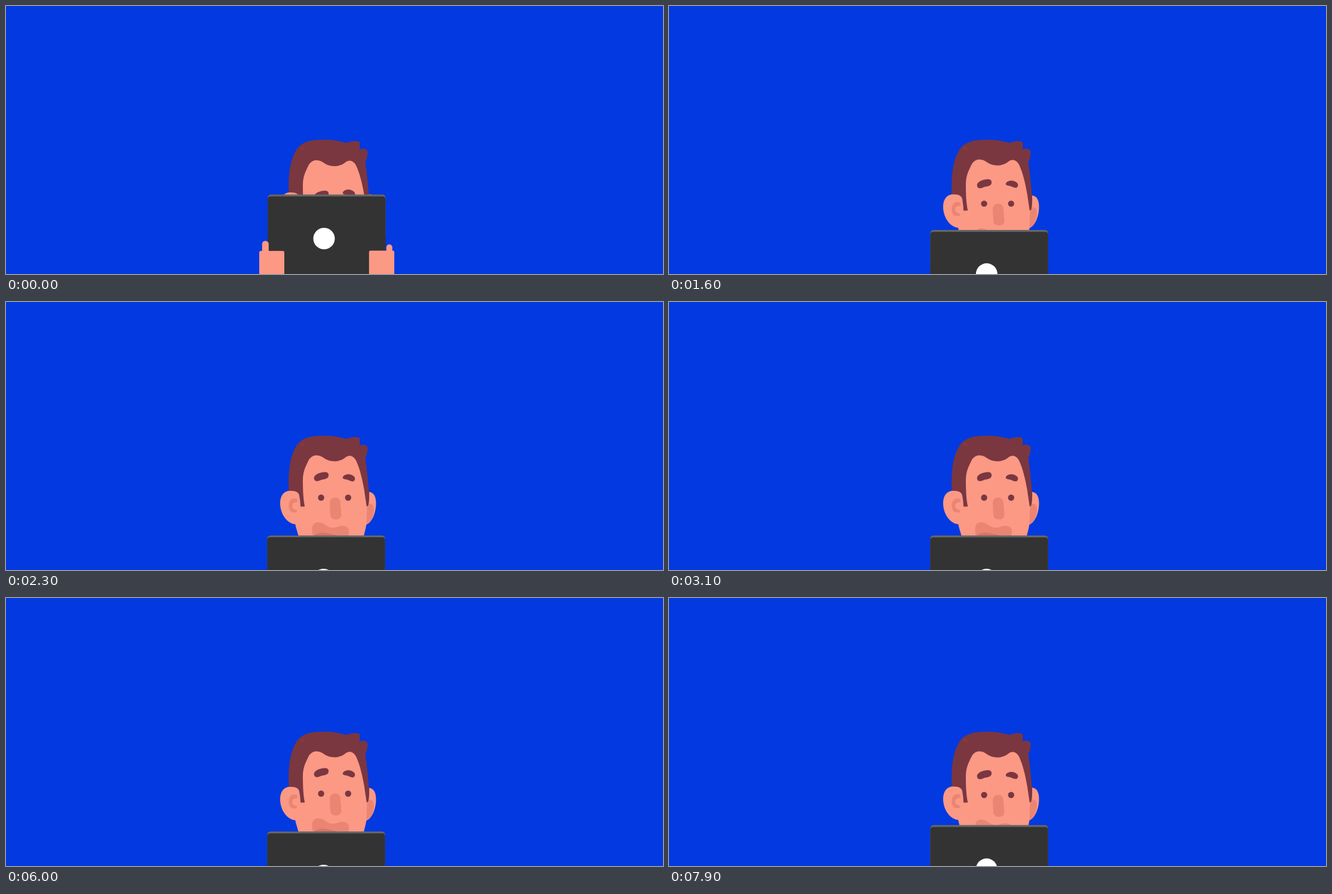
These frames come from a looping animation (1100x450 px, 8000 ms). An HTML page:

```html
<!DOCTYPE html>
<html lang="en">
<head>
<meta charset="utf-8">
<title>Peeking over the laptop</title>
<style>
  html, body { margin: 0; width: 100%; height: 100%; overflow: hidden; background: #0239e1; }
  svg { display: block; width: 100vw; height: 100vh; }
  .skin { fill: #fb9985; }
  .shade { fill: #ea8574; }
  .lip { fill: #da7466; }
  .hair { fill: #7a3740; }
</style>
</head>
<body>
<svg viewBox="0 0 1100 450" preserveAspectRatio="xMidYMid slice">
  <rect width="1100" height="450" fill="#0239e1"/>

  <g id="earR">
    <path class="skin" d="M603 374C613 370 619.500 354 619.500 338C619.500 327 616 319 607 319L601 330Z"/>
    <path class="shade" d="M603 374C614 368 618 352 615 342C612 337 607 338 603 343Z"/>
  </g>

  <path class="skin" d="M484 330H605L603.500 373C602 382 600 388 599 394L596 450H500L490 394C488 386 485 378 484 372Z"/>
  <path class="hair" d="M473.500 318C472 284 475.500 258 486.500 241C497 226 515 224.500 532 224.500C546 224.500 558 226 569 230C577 227 590 225 592 229C593 234 592 238 592 241C598 238 606 239 605.500 247C605 255 603 259 601.500 262C604 275 606 300 608 320C608.500 336 607 343 605 343L493 343.500L491.500 324Z"/>
  <circle cx="496" cy="239" r="3" fill="#873a3d"/>
  <path id="forehead" class="skin" d="M497 300C497 283 502.500 275 506.500 266C512 256 522 255.500 530 260.500C541 269 556 270 567 262C573 256 581 257 586 266C592 278 597 299 599.800 316L604.500 348H500L500 342C498 332 497 320 497 300Z"/>

  <g id="earL">
    <path class="skin" d="M484 373C470 372 459 355 459 338C459 325 465 317 476 317C486 317 491.500 320 491.500 328L493 344V373Z"/>
    <path class="shade" d="M488 331C482 328 474 330 473.500 341C473 351 478 355 487 353V349C478 349 475 336 488 336Z"/>
  </g>

  <g id="features">
    <path class="shade" d="M515 396C511 384 511 371 521 370C532 369 536 378 546 379C555 379 558 375 566 376C575 377 576 386 572 396Z"/>
    <path class="lip" d="M515 398C515 386 530 386 541 389C549 390 555 391 560 398Z"/>
    <path class="shade" d="M542 338C542 325 560 325 560 338L561.500 357C562 368 543 368 543 357Z"/>
    <g class="hair">
      <ellipse class="eye" cx="527.600" cy="328.500" rx="5.200" ry="5.200"/>
      <ellipse class="eye" cx="572.800" cy="328.500" rx="5.200" ry="5.200"/>
    </g>
  </g>
  <path id="browL" class="hair" d="M516 297C514 292 522 287 530 286C538 284 541 288 540 292C539 298 532 297 527 299C521 302 516 301 516 297Z"/>
  <path id="browR" class="hair" d="M564 294C566 289 575 288 580 291C586 294 585 299 582 301C577 302 574 298.500 570 298C566 297.500 563 296.500 564 294Z"/>

  <g id="laptop">
    <path fill="#666" d="M437.300 460V398Q437.300 392 443.300 392H628.700Q634.700 392 634.700 398V460Z"/>
    <path fill="#333" d="M437.300 540V400Q437.300 395.200 442.300 395.200H629.700Q634.700 395.200 634.700 400V540Z"/>
    <circle cx="531.700" cy="466" r="18" fill="#fff"/>
    <g class="skin">
      <rect x="428" y="470" width="11" height="40" rx="5"/>
      <rect x="423.200" y="486.700" width="42" height="60" rx="2.500"/>
      <rect x="636" y="475.700" width="10" height="40" rx="5"/>
      <rect x="607" y="486.200" width="42.300" height="60" rx="2.500"/>
    </g>
  </g>
</svg>
<script>
const LOOP = 8000, STEP = 100, TRAVEL = 1800;
const LOWER_AT = 590, RAISE_AT = 7360;
const BLINKS = [2500, 4700, 5100], BLINK_TIME = 200;

// how far each part shifts when the laptop is fully up
const shifts = {
  laptop: [0.8, -75.5],
  features: [0, 16],
  forehead: [0, 1.5],
  browL: [0, 24.5],
  browR: [0, 19],
  earL: [0, -4],
  earR: [0, -3]
};
const parts = Object.entries(shifts).map(([id, [x, y]]) => ({ node: document.getElementById(id), x, y }));
const eyes = document.querySelectorAll('.eye');

// cubic-bezier(.625, 0, .22, 1)
function ease(x) {
  if (x <= 0) return 0;
  if (x >= 1) return 1;
  let lo = 0, hi = 1;
  for (let i = 0; i < 24; i++) {
    const s = (lo + hi) / 2, r = 1 - s;
    if (3 * r * r * s * 0.625 + 3 * r * s * s * 0.22 + s ** 3 < x) lo = s; else hi = s;
  }
  return lo * lo * (3 - 2 * lo);
}

function draw(time) {
  const t = Math.floor(time / STEP) * STEP;
  // 0 = laptop low, 1 = laptop hiding the face
  const up = 1 - ease((t - LOWER_AT) / TRAVEL) + ease((t - RAISE_AT) / TRAVEL);
  for (const { node, x, y } of parts) {
    node.setAttribute('transform', `translate(${(x * up).toFixed(2)} ${(y * up).toFixed(2)})`);
  }
  const shut = BLINKS.some(b => t >= b && t < b + BLINK_TIME);
  eyes.forEach(eye => eye.setAttribute('ry', shut ? 0.9 : 5.2));
}

function tick() {
  draw(performance.now() % LOOP);
  requestAnimationFrame(tick);
}
tick();
</script>
</body>
</html>
```
